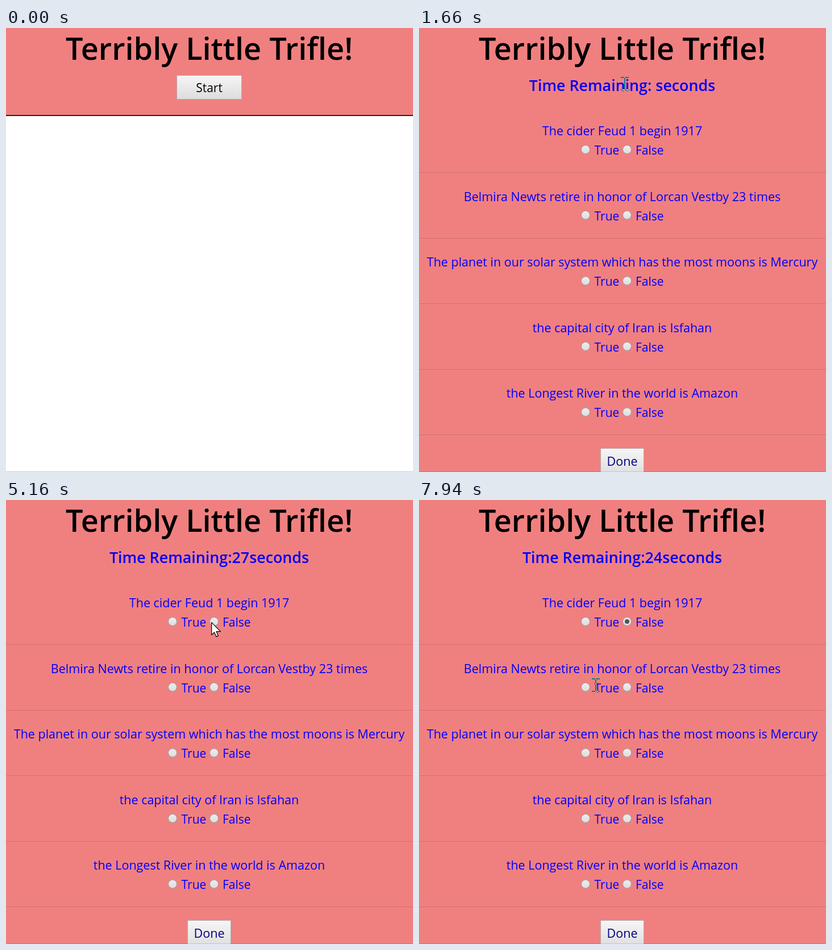
These frames come from a looping animation (716 px wide and 782 px high, 8 s). An HTML page with a canvas:

```html
<!DOCTYPE html>
<html lang="en">
<head>
<meta charset="utf-8">
<title>Quiz</title>
<style>
html, body { margin: 0; width: 100%; height: 100%; overflow: hidden; background: #fff; }
canvas { display: block; }
</style>
</head>
<body>
<canvas id="stage" width="716" height="782"></canvas>
<script>
const ctx = document.getElementById('stage').getContext('2d');
const W = 716, H = 782, MID = 357.5, LOOP = 8000;
const FONT = '"Open Sans", "Noto Sans", sans-serif';
const CORAL = '#f08080', BLUE = '#0000ff';
const ROW_PITCH = 115.6;
const STEP = 75, PRESS = 70, SECOND = 996;
const START_AT = 1660, PICK_AT = 7250;
const START_BUTTON = { x: 300, y: 83, w: 115, h: 43 };

const QUESTIONS = [
  'The cider Feud 1 begin 1917',
  'Belmira Newts retire in honor of Lorcan Vestby 23 times',
  'The planet in our solar system which has the most moons is Mercury',
  'the capital city of Iran is Isfahan',
  'the Longest River in the world is Amazon'
];

// Each stop is reached between its two times, from the stop before it.
const ENTRY = { x: 458, y: 577 };
const STOPS = [
  { from: 340, to: 570, x: 406, y: 198 },
  { from: 800, to: 1040, x: 362, y: 98 },
  { from: 2210, to: 2900, x: 306, y: 213 },
  { from: 3140, to: 3370, x: 338, y: 217 },
  { from: 3540, to: 3680, x: 331, y: 217 },
  { from: 3850, to: 4370, x: 364, y: 218 },
  { from: 4520, to: 5850, x: 358, y: 212 },
  { from: 6000, to: 6080, x: 380, y: 215 },
  { from: 6400, to: 6480, x: 374, y: 213 },
  { from: 7480, to: 7940, x: 311, y: 326 }
];

const ARROW = new Path2D('M.5 .5V22.5L5.3 17.8 8.8 25.5 12.2 24 8.9 16.5H16.2Z');
const HAND = new Path2D('M-1.5 2.5Q1-1.5 3.5 2.5V10L12 12.5Q14.5 14 14.5 17V22L11.5 30.5H1L-9 17Q-8 12.5-1.5 18Z');

let textBoxes = [];

function pointerAt(t) {
  const i = STOPS.findLastIndex(stop => stop.from <= t);
  if (i < 0) return null;
  const a = STOPS[i - 1] || ENTRY, b = STOPS[i];
  const steps = Math.round((b.to - b.from) / STEP) + 1;
  const f = Math.min(1, (Math.floor((t - b.from) / (b.to - b.from) * (steps - 1)) + 1) / steps);
  return { x: a.x + (b.x - a.x) * f, y: a.y + (b.y - a.y) * f };
}

const inside = (p, box) =>
  p && p.x >= box.x && p.x <= box.x + box.w && p.y >= box.y && p.y <= box.y + box.h;

const justBefore = (t, moment) => t >= moment - PRESS && t < moment;

function text(str, x, y, size, color, { weight = 400, align = 'center' } = {}) {
  ctx.font = `${weight} ${size}px ${FONT}`;
  ctx.textAlign = align;
  ctx.fillStyle = color;
  ctx.fillText(str, x, y);
  const w = ctx.measureText(str).width;
  const left = align === 'center' ? x - w / 2 : x;
  textBoxes.push({ x: left - 5, y: y - size, w: w + 5, h: size * 1.4 });
}

function rect(x, y, w, h, color) {
  ctx.fillStyle = color;
  ctx.fillRect(x, y, w, h);
}

function disc(x, y, r, fill) {
  ctx.beginPath();
  ctx.arc(x, y, r, 0, Math.PI * 2);
  ctx.fillStyle = fill;
  ctx.fill();
}

function shade(y0, y1, top, bottom) {
  const g = ctx.createLinearGradient(0, y0, 0, y1);
  g.addColorStop(0, top);
  g.addColorStop(1, bottom);
  return g;
}

function button({ x, y, w, h }, top, bottom) {
  rect(x, y, w, h, '#b2aaaa');
  rect(x + 1, y + 1, w - 2, h - 2, shade(y, y + h, top, bottom));
}

function radio(x, y, checked, pressed) {
  disc(x, y, 8, '#a49898');
  disc(x, y, 7, pressed ? '#cfcfcf' : shade(y - 7, y + 7, '#eeeeee', '#dddddd'));
  if (checked) disc(x, y, 4, '#555555');
}

function drawStart(hover, pressed) {
  rect(0, 0, W, H, '#ffffff');
  rect(0, 0, W, 153.5, CORAL);
  rect(0, 153.3, W, 1.7, '#000000');
  rect(0, H - 1, W, 1, '#c8c8c8');
  if (pressed) button(START_BUTTON, '#dadada', '#f6f6f6');
  else button(START_BUTTON, hover ? '#fafafa' : '#f6f6f6', hover ? '#e4e4e4' : '#dcdcdc');
  text('Start', MID, 113, 21, '#000000');
}

function drawQuiz(t, pressed) {
  rect(0, 0, W, H, CORAL);
  const elapsed = Math.floor((t - START_AT) / SECOND);
  const left = elapsed ? 30 - elapsed : ' ';
  text(`Time Remaining:${left}seconds`, MID, 111, 26.8, BLUE, { weight: 600 });

  QUESTIONS.forEach((question, i) => {
    const y = i * ROW_PITCH;
    const first = i === 0;
    text(question, MID, 189 + y, 21.5, BLUE);
    radio(293, 214 + y);
    radio(366, 214 + y, first && t >= PICK_AT, first && pressed);
    text('True', 308.5, 223 + y, 21, BLUE, { align: 'left' });
    text('False', 381, 223 + y, 21, BLUE, { align: 'left' });
    rect(0, Math.round(254 + y), W, 1, 'rgba(0,0,0,.13)');
  });

  button({ x: 319, y: 740, w: 77, h: 50 }, '#f6f6f6', '#dcdcdc');
  text('Done', MID, 771, 21.5, '#000080');
  rect(0, H - 1, W, 1, 'rgba(0,0,0,.12)');
}

function drawBeam({ x, y }) {
  ctx.save();
  ctx.globalCompositeOperation = 'difference';
  ctx.translate(Math.round(x), Math.round(y));
  rect(-1, -10, 2, 20, '#ffffff');
  for (const edge of [-12, 10]) {
    for (const side of [-7, 1]) rect(side, edge, 6, 2, '#ffffff');
  }
  ctx.restore();
}

function drawShape(path, { x, y }) {
  ctx.save();
  ctx.translate(x, y);
  ctx.lineWidth = 1.2;
  ctx.lineJoin = 'round';
  ctx.fillStyle = '#ffffff';
  ctx.strokeStyle = '#000000';
  ctx.fill(path);
  ctx.stroke(path);
  ctx.restore();
}

function draw(t) {
  const pointer = pointerAt(t);
  const pressed = justBefore(t, START_AT) || justBefore(t, PICK_AT);
  const quiz = t >= START_AT;
  const hover = !quiz && inside(pointer, START_BUTTON);

  textBoxes = [];
  if (quiz) drawQuiz(t, pressed);
  else drawStart(hover, pressed);
  text('Terribly Little Trifle!', MID, 56, 54, '#000000', { weight: 600 });

  if (!pointer) return;
  if (hover) drawShape(HAND, pointer);
  else if (quiz && textBoxes.some(box => inside(pointer, box))) {
    drawBeam(pointer);
  } else drawShape(ARROW, pointer);
  if (pressed) disc(pointer.x, pointer.y, 16.5, 'rgba(255,255,0,.55)');
}

const begin = performance.now();
function frame() {
  draw((performance.now() - begin) % LOOP);
  requestAnimationFrame(frame);
}
frame();
</script>
</body>
</html>
```
